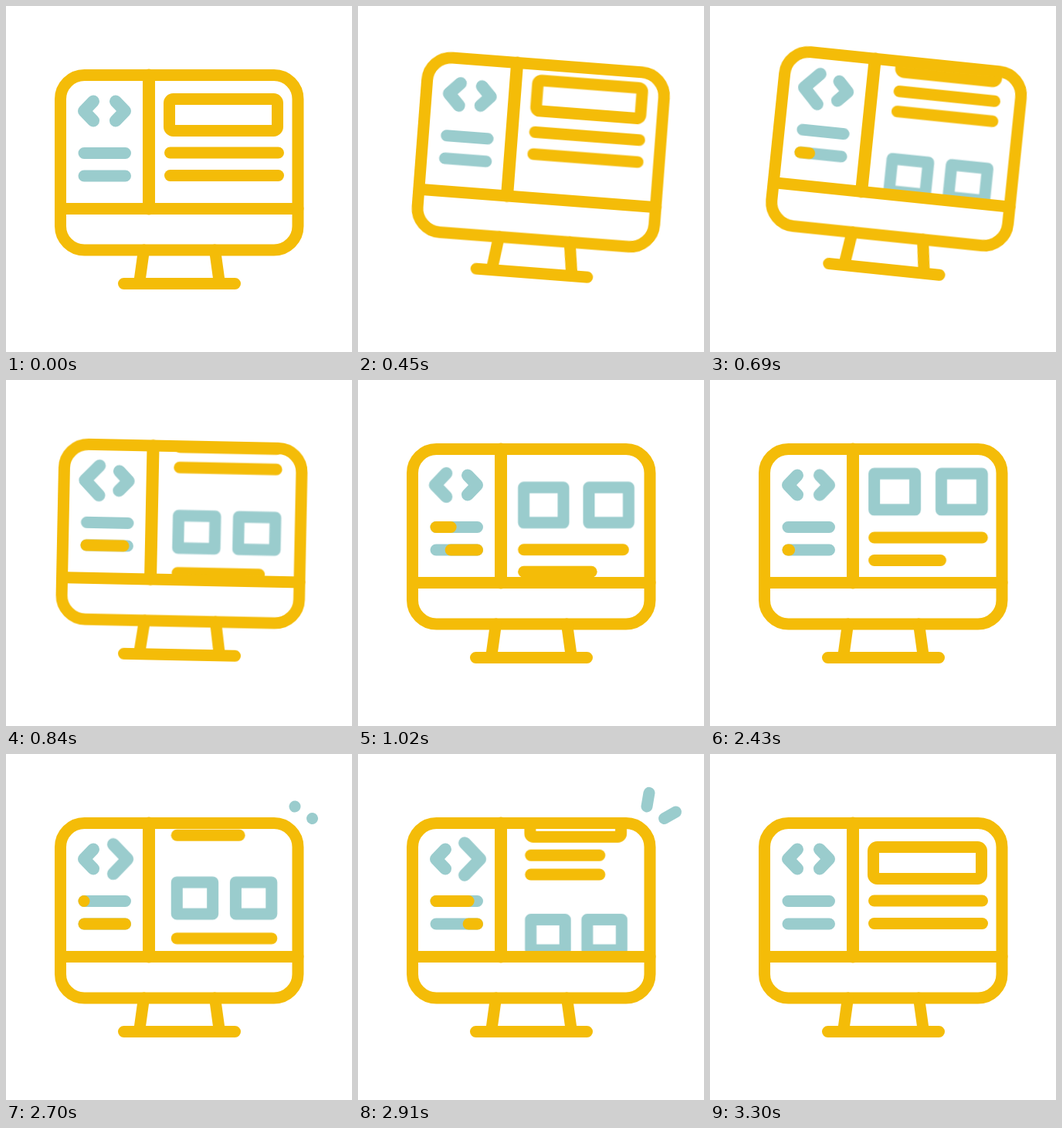
Animation of 448x448 px, one loop 3600 ms. Source, as an HTML page without scripts:

```html
<!DOCTYPE html>
<html lang="en">
<head>
<meta charset="utf-8">
<title>Web page on a monitor</title>
<style>
  html, body { margin: 0; width: 100%; height: 100%; overflow: hidden; background: #fff; }
  svg {
    display: block; width: 100vw; height: 100vh;
    fill: none; stroke-width: 15; stroke-linecap: round; stroke-linejoin: round;
    --gold: #f4bc08; --teal: #9acccd;
  }
  .gold { stroke: var(--gold); }
  .teal { stroke: var(--teal); }

  .tilt, .page, .scroll, .settle, .chevron, .sweep, .sparks {
    animation: 3.6s cubic-bezier(.33, 0, .67, 1) infinite;
  }
  .tilt { animation-name: tilt; transform-origin: 406px 359px; }
  .page { animation-name: zoom; transform-origin: 282.5px 176px; }
  .page * { vector-effect: non-scaling-stroke; }
  .scroll { animation-name: scroll; }
  .settle { animation-name: settle; transform-origin: 212.5px 0; }
  .chevron {
    animation-name: pulse; transform-origin: 107px 136px;
    stroke-width: 16; vector-effect: non-scaling-stroke; --peak: 1.6;
  }
  .chevron.right { transform-origin: 148px 136px; --peak: 1.7; }
  .late { animation-delay: -1.5s; }

  .sweep { animation-name: sweep; animation-duration: 1.8s; animation-delay: -.9s; stroke-dasharray: 100 300; }
  .sweep.early { animation-delay: -1.2s; }
  .sparks { animation-name: second-half; }

  @keyframes tilt {
    0%, 8.333%, 25.7%, 100% { transform: rotate(0deg); }
    16.1% { transform: rotate(7.8deg); }
  }
  @keyframes zoom {
    0%, 8.333%, 32%, 66.667%, 91.667%, 100% { transform: scale(1); }
    20.833% { transform: scale(.88); }
    79.167% { transform: scale(.832); }
  }
  @keyframes scroll {
    0%, 8.333%, 91.667%, 100% { transform: translateY(0); }
    33.333%, 66.667% { transform: translateY(-168.5px); }
  }
  @keyframes settle {
    0%, 16.667% { transform: scaleX(var(--from)); }
    33.333%, 100% { transform: scaleX(1); }
  }
  @keyframes pulse {
    0%, 8.333%, 33.333%, 100% { transform: scale(1); }
    20.833% { transform: scale(var(--peak)); }
  }
  /* A stroke grows from its start, then empties towards its end. */
  @keyframes sweep {
    0% { stroke-dashoffset: 100; visibility: hidden; }
    16.667% { stroke-dashoffset: 0; visibility: visible; }
    33.333%, 100% { stroke-dashoffset: -100; visibility: hidden; }
  }
  @keyframes second-half {
    0%, 49.99% { opacity: 0; }
    50%, 100% { opacity: 1; }
  }
</style>
</head>
<body>
<svg viewBox="0 0 448 448">
  <clipPath id="view"><path d="M185 89.500H378V262.500H185Z"/></clipPath>

  <g class="tilt">
    <g clip-path="url(#view)">
      <g class="page">
        <g class="scroll">
          <g class="gold">
            <rect x="211.500" y="120.500" width="140" height="41" rx="5"/>
            <g style="--from: .66">
              <path class="settle late" d="M212.500 190H352.500"/>
              <path class="settle late" d="M212.500 219.500H352.500"/>
            </g>
            <path class="settle" style="--from: .757" d="M212.500 372H352.500"/>
            <path class="settle" style="--from: 1.23" d="M212.500 401.500H298.500"/>
          </g>
          <g class="teal">
            <rect x="212.500" y="289" width="53" height="47"/>
            <rect x="299.500" y="289" width="53" height="47"/>
          </g>
        </g>
      </g>
    </g>

    <g class="teal">
      <path class="chevron" d="M113 123.500L101 136L113 148.500"/>
      <path class="chevron right late" d="M142 123.500L154 136L142 148.500"/>
      <path d="M101 190.500H154.500M101 220H154.500"/>
    </g>
    <g class="gold">
      <path class="sweep" pathLength="100" d="M101 190.500H154.500"/>
      <path class="sweep early" pathLength="100" d="M101 220H154.500"/>

      <rect x="70.500" y="89.500" width="307.500" height="226.500" rx="31"/>
      <path d="M70.500 262.500H378"/>
      <path d="M185 89.500V262.500" stroke-width="16"/>
      <path d="M178.500 316L172.500 359.500M270.500 316L276.500 359.500M152.500 359.500H296.500"/>
    </g>
  </g>

  <g class="sparks teal">
    <path class="sweep" pathLength="100" d="M374 68L377.800 45.500"/>
    <path class="sweep" pathLength="100" d="M396.500 83.500L415.500 72.700"/>
  </g>
</svg>
</body>
</html>
```
